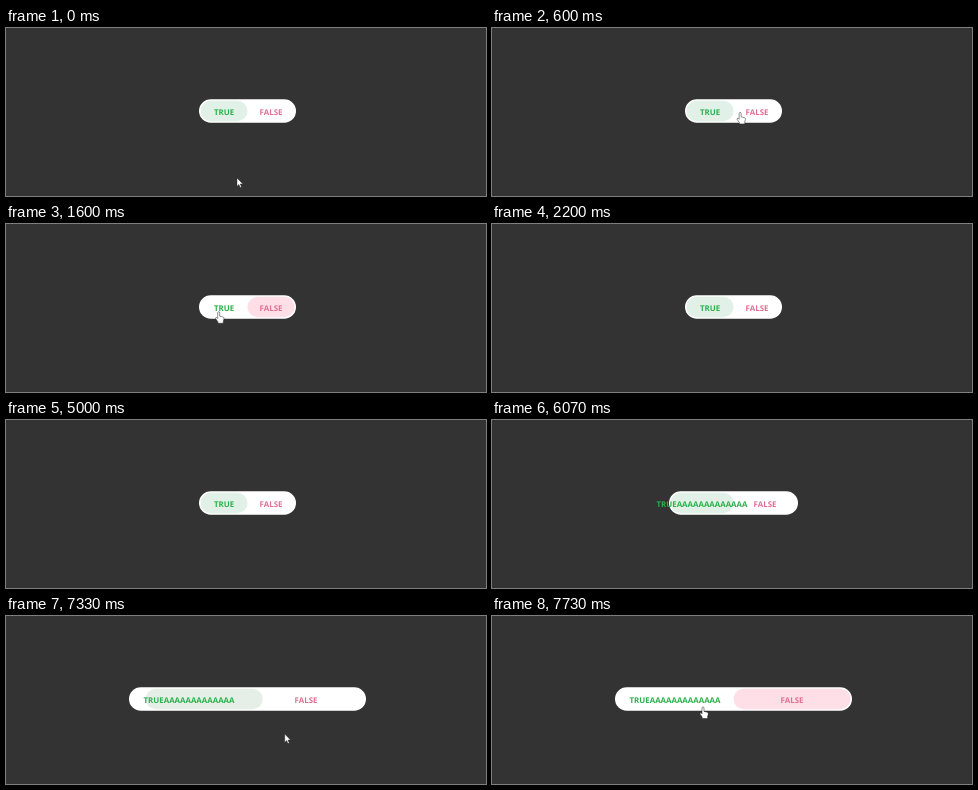
An HTML page for the animation above (8 s loop, 480 by 168 pixels).

```html
<!DOCTYPE html>
<html lang="en">
<head>
<meta charset="utf-8">
<title>Toggle switch</title>
<style>
  html, body { margin: 0; width: 100%; height: 100%; overflow: hidden; background: #333; }
  svg { display: block; }
  text {
    font: 700 7.9px "Open Sans", "Noto Sans", sans-serif;
    text-anchor: middle;
    text-rendering: geometricPrecision;
  }
</style>
</head>
<body>
<svg width="480" height="168" viewBox="0 0 480 168">
  <rect id="pill" y="71.2" height="23.6" rx="11.8" fill="#fff"/>
  <rect id="thumb" y="72.8" height="20.4" rx="10.2"/>
  <text id="yes" y="86.7" fill="#2bb04c">TRUE</text>
  <text id="no" y="86.7" fill="#e07093">FALSE</text>
  <g id="cursor" fill="#fff" stroke="#222" stroke-linejoin="round">
    <path id="arrow" stroke-width=".4" d="M0 0V8.3L1.9 6.5L3.2 9.5L4.5 8.9L3.2 6H5.8Z"/>
    <path id="hand" stroke-width=".5" d="M-1 1Q-1 0 0 0T1 1V4.4L4.3 5.2Q5.5 5.6 5.3 7L4.6 9.5V11.5H-.8V10L-3 7Q-3.4 5.6 -2 5.8L-1 6.8Z"/>
  </g>
</svg>
<script>
const LOOP = 8000, TICK = 1000 / 15;
const CENTER = 241.5, TOP = 71.2, BOTTOM = 94.8, PAD = 1.5;
const GREEN = [226, 241, 231], PINK = [255, 223, 231];
const LONG = "TRUE" + "A".repeat(13);

// Each visit of the pointer: where it appears, then eased moves between rests.
const visits = [
  { from: 0, to: 2190, x: 231, y: 150, moves: [
    { start: 70, end: 400, x: 217, y: 88 },
    { start: 400, end: 730, x: 252, y: 84 },
    { start: 970, end: 1200, x: 250, y: 127 },
    { start: 1270, end: 1670, x: 212, y: 87 },
    { start: 1870, end: 2190, x: 114, y: 89 }
  ] },
  { from: 6730, to: LOOP, x: 300, y: 139, moves: [
    { start: 6730, end: 7130, x: 281, y: 86 },
    { start: 7230, end: 7460, x: 278, y: 129 },
    { start: 7530, end: 7730, x: 211, y: 91 }
  ] }
];

const [pill, thumb, yes, no, cursor, arrow, hand] =
  ["pill", "thumb", "yes", "no", "cursor", "arrow", "hand"].map(id => document.getElementById(id));
const mix = (a, b, k) => a + (b - a) * k;
const show = (node, visible) => { node.style.display = visible ? "" : "none"; };
const set = (node, attrs) => {
  for (const key in attrs) node.setAttribute(key, attrs[key]);
};

// The CSS "ease" curve, cubic-bezier(.25, .1, .25, 1).
function ease(x) {
  if (x <= 0) return 0;
  if (x >= 1) return 1;
  const curve = (s, a, b) => 3 * (1 - s) ** 2 * s * a + 3 * (1 - s) * s * s * b + s ** 3;
  let lo = 0, hi = 1;
  for (let i = 0; i < 20; i++) {
    const mid = (lo + hi) / 2;
    if (curve(mid, .25, .25) < x) lo = mid; else hi = mid;
  }
  return curve(lo, .1, 1);
}
const step = (t, start, duration) => ease((t - start) / duration);

function pointer(t) {
  const visit = visits.find(v => t >= v.from && t < v.to);
  if (!visit) return null;
  let { x, y } = visit;
  for (const move of visit.moves) {
    const k = step(t, move.start, move.end - move.start);
    x = mix(x, move.x, k);
    y = mix(y, move.y, k);
  }
  return { x, y };
}

function draw(t) {
  const width = mix(97, 237, step(t, 6036, 180));
  const left = CENTER - width / 2;
  const half = width / 2 - PAD;
  const on = step(t, 992, 300) - step(t, 1870, 300) + step(t, 7297, 300);
  const tint = GREEN.map((c, i) => Math.round(mix(c, PINK[i], on)));

  set(pill, { x: left, width });
  set(thumb, { x: left + PAD + half * on, width: half, fill: `rgb(${tint})` });
  set(yes, { x: CENTER - half / 2 });
  set(no, { x: CENTER + half / 2 });
  yes.textContent = t < 5860 ? "TRUE" : LONG;

  const at = pointer(t);
  show(cursor, at);
  if (!at) return;
  const over = Math.abs(at.x - CENTER) < width / 2 && at.y > TOP && at.y < BOTTOM;
  set(cursor, { transform: `translate(${at.x} ${at.y})` });
  show(hand, over);
  show(arrow, !over);
}

// The motion advances in ticks, like a 15 fps screen recording.
const begin = performance.now();
function frame() {
  const t = (performance.now() - begin) % LOOP;
  draw(Math.floor((t + 8) / TICK) * TICK);
  requestAnimationFrame(frame);
}
frame();
</script>
</body>
</html>
```
